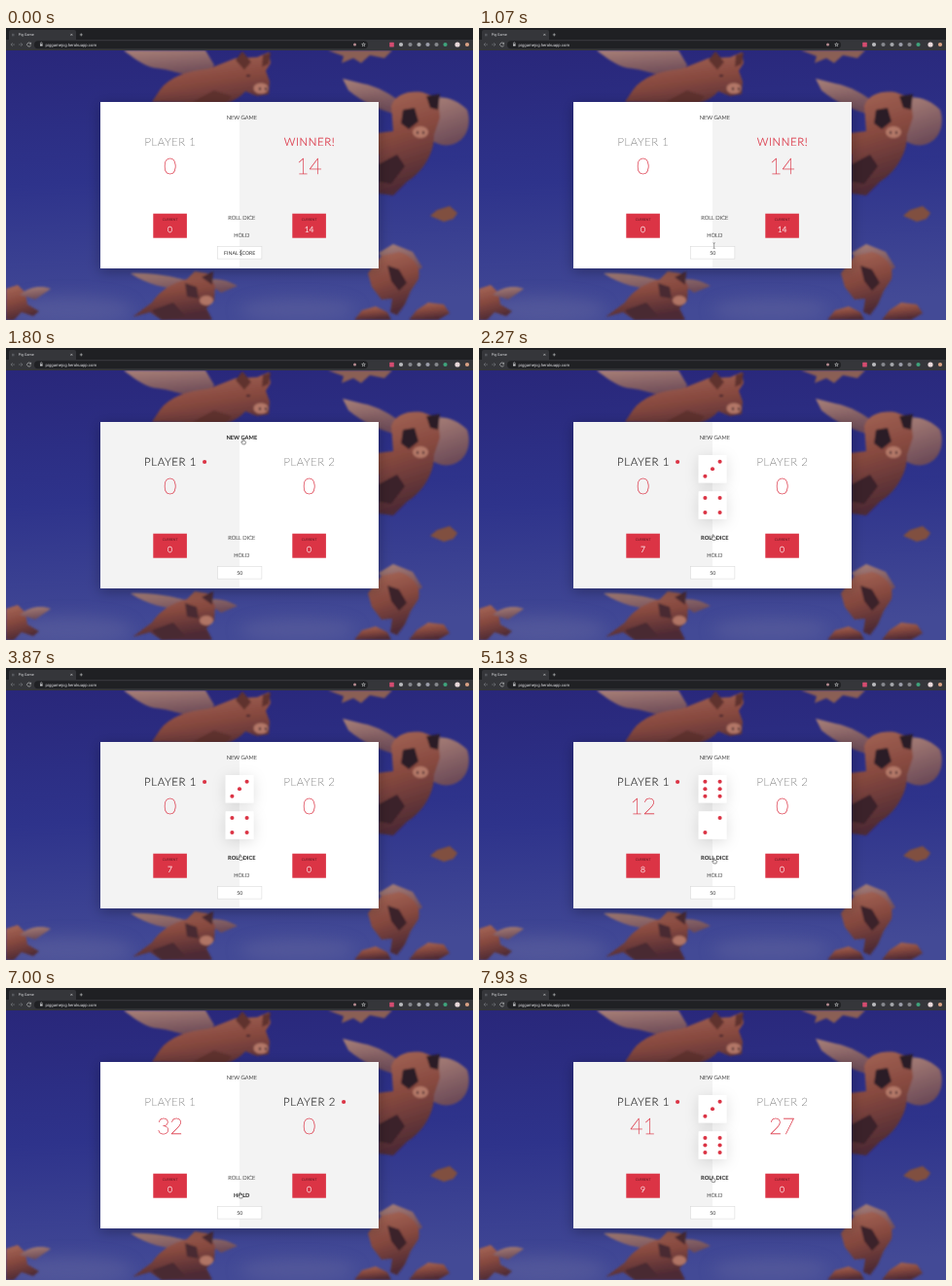
Animation of 480 by 300 pixels, one loop 8000 ms. Source, as an HTML page:

```html
<!DOCTYPE html>
<html lang="en">
<head>
<meta charset="utf-8">
<title>Pig Game</title>
<style>
  html, body { margin: 0; width: 100%; height: 100%; overflow: hidden; background: #2d3588; }
  svg { display: block; width: 100vw; height: 100vh; }
  text { font-family: Lato, sans-serif; text-rendering: geometricPrecision; }
  #game text { text-anchor: middle; }
  .btn { font-size: 5.72px; font-weight: 300; fill: #222; stroke: #222; stroke-width: .1; }
  .btn.hover { font-weight: 700; stroke: none; }
  .name { font-size: 11.43px; font-weight: 100; letter-spacing: .57px; fill: #777; stroke: #777; stroke-width: .22; }
  .name.active { font-weight: 300; fill: #222; stroke: #222; stroke-width: .12; }
  .name.winner { font-weight: 300; fill: #db3445; stroke: #db3445; stroke-width: .2; }
  .score { font-size: 22.86px; font-weight: 100; fill: #db3445; stroke: #db3445; stroke-width: .28; }
  .label { font-size: 3.43px; fill: #5a1820; }
  .current { font-size: 8.57px; font-weight: 300; fill: #fff; stroke: #fff; stroke-width: .15; }
  .field { font-size: 5.2px; fill: #333; }
  .red { fill: #db3445; }
  .ui { font-family: Roboto, sans-serif; fill: #dcdde0; }
</style>
</head>
<body>
<svg viewBox="0 0 480 300" preserveAspectRatio="none">
  <defs>
    <linearGradient id="sky" x2="0.1" y2="1">
      <stop offset="0" stop-color="#29277a"/>
      <stop offset=".5" stop-color="#2e338b"/>
      <stop offset="1" stop-color="#434a96"/>
    </linearGradient>
    <linearGradient id="skin" x2=".25" y2="1">
      <stop offset="0" stop-color="#a8695a"/>
      <stop offset=".5" stop-color="#87493f"/>
      <stop offset="1" stop-color="#4e2a34"/>
    </linearGradient>
    <linearGradient id="wing" x2=".3" y2="1">
      <stop offset="0" stop-color="#a98078"/>
      <stop offset="1" stop-color="#6e4c58"/>
    </linearGradient>
    <filter id="soft" x="-5%" y="-5%" width="110%" height="110%"><feGaussianBlur stdDeviation=".9"/></filter>
    <filter id="haze" x="-50%" y="-100%" width="200%" height="300%"><feGaussianBlur stdDeviation="8"/></filter>
    <filter id="cardShade" x="-15%" y="-20%" width="130%" height="145%"><feDropShadow dx="0" dy="2.9" stdDeviation="7" flood-opacity=".3"/></filter>
    <filter id="dieShade" x="-100%" y="-100%" width="300%" height="300%"><feDropShadow dx="0" dy="2.9" stdDeviation="7" flood-opacity=".13"/></filter>
  </defs>

  <rect y="22" width="480" height="278" fill="url(#sky)"/>
  <g filter="url(#haze)" fill="#62659f" opacity=".5">
    <ellipse cx="65" cy="290" rx="65" ry="15"/>
    <ellipse cx="300" cy="290" rx="60" ry="12"/>
  </g>

  <g filter="url(#soft)" fill="url(#skin)">
    <!-- top centre -->
    <path fill="url(#wing)" d="M205 50C184 50 168 42 152 41 140 38 130 30 121 23H205L214 38Z"/>
    <path d="M150 76L158 64C168 50 186 44 208 42L236 31 258 30 270 25 272 36 267 44 271 55 270 68 258 70 246 65C240 72 232 76 226 77H206L190 95 180 92 184 77Z"/>
    <path fill="#5f332f" d="M236 33L243 24 252 35 245 43ZM264 28L272 25 270 37 263 40ZM190 77L214 64 232 70 226 77Z"/>
    <ellipse cx="262" cy="62" rx="7.5" ry="5.5" fill="#b37767"/>
    <path fill="#3a222a" d="M247 48h4v2h-4ZM260 61h2v3h-2ZM266 61h2v3h-2Z"/>
    <!-- top right corner -->
    <path fill="#8a5f54" d="M331 23H397L389 31 374 28 365 36 357 31 345 36 347 29Z"/>
    <!-- right -->
    <path fill="url(#wing)" d="M432 74C446 68 462 72 474 84 478 96 475 110 466 116 454 124 446 120 438 116Z"/>
    <path fill="url(#wing)" d="M398 88C384 84 366 76 352 64L346 52 366 57C382 60 396 68 408 78Z"/>
    <path d="M396 80C400 68 414 64 428 66L444 72 446 92 440 110C440 130 428 148 412 158L398 172 383 170V130L362 132 360 123 381 108 398 106Z"/>
    <path fill="#2b1d27" d="M408 84L420 82 424 96 414 104 406 98ZM432 70L446 68 444 84 436 82Z"/>
    <ellipse cx="426" cy="107" rx="8" ry="6" fill="#b37868"/>
    <path fill="#3a222a" d="M422 106h2v3h-2ZM428 106h2v3h-2ZM383 140L402 130 410 142 396 160 383 158Z"/>
    <!-- distant -->
    <path fill="#80503f" d="M436 193L443 187 456 183 464 190 460 196 450 199 443 196Z"/>
    <!-- lower right -->
    <path fill="url(#wing)" d="M383 231L398 222 418 230 428 246 416 254 396 248Z"/>
    <path d="M372 252L386 234 404 230C418 234 427 244 424 258L416 270 410 284 402 295 395 292 397 278 386 279 376 266Z"/>
    <path fill="#3b2229" d="M392 244L404 248 412 262 404 270 396 260Z"/>
    <path d="M414 300L422 290 434 282 450 284 456 293 444 300Z"/>
    <path d="M358 300L366 290 380 286 392 292 396 300Z"/>
    <!-- lower left -->
    <path fill="url(#wing)" d="M182 268C164 268 146 264 128 252 150 251 170 255 188 260ZM204 260C214 256 226 258 238 265L221 272Z"/>
    <path d="M130 297L150 282C158 270 170 262 186 258L194 250 207 252 215 265 214 280 206 288 212 300H160L148 292Z"/>
    <path fill="#4a2a30" d="M184 262L196 266 198 278 186 276ZM201 256L213 250 212 264ZM150 290L172 282 184 296 160 300Z"/>
    <ellipse cx="206" cy="280" rx="7" ry="5" fill="#b07465"/>
    <!-- left edge -->
    <path d="M0 268L12 264 20 272 22 284 34 291 28 296 16 292 8 300H0Z"/>
    <path fill="url(#wing)" d="M14 274C24 266 36 264 46 268L30 279Z"/>
  </g>

  <g id="browser"></g>

  <g id="game">
    <g filter="url(#cardShade)"><rect x="97" y="76" width="286" height="171" fill="#fff"/></g>
    <rect id="side" y="76" width="143" height="171" fill="#f3f3f3"/>
    <rect x="217.5" y="224.3" width="45.4" height="12.8" fill="#fff" stroke="#d4d4d4" stroke-width=".5"/>
  </g>
  <g id="ibeam" fill="none" stroke="#333" stroke-width=".4"><path d="M-1-3Q0-3 0-2.2Q0-3 1-3M0-2.5V2.5M-1 3Q0 3 0 2.2Q0 3 1 3"/></g>
  <g id="hand"><path d="M-.9-2.5Q-.4-3.2 .2-2.5V-.7L2-.3Q2.6 0 2.4 1L1.9 2.9H-.9L-2.3.8Q-2.2 0-1.5.3L-.9.8Z" fill="#fff" stroke="#222" stroke-width=".5"/></g>
  <g id="arrow"><path d="M-1.5-3V2.2L-.3 1.2.6 3 1.5 2.6.7.9H2.2Z" fill="#222" stroke="#fff" stroke-width=".45"/></g>
</svg>
<script>
const LOOP = 8000, STEP = 1000 / 15;
const $ = id => document.getElementById(id);

function add(parent, tag, attrs, content = '') {
  const el = document.createElementNS('http://www.w3.org/2000/svg', tag);
  for (const key in attrs) el.setAttribute(key, attrs[key]);
  el.textContent = content;
  return parent.appendChild(el);
}

function drawBrowser(g) {
  const box = (x, y, width, height, fill, rx = 0) => add(g, 'rect', { x, y, width, height, fill, rx });
  const label = (x, y, size, str) => add(g, 'text', { x, y, 'font-size': size, class: 'ui' }, str);
  const line = (d, stroke = '#c8c9cc') => add(g, 'path', { d, fill: 'none', stroke, 'stroke-width': .6 });
  const dot = (cx, fill, r = 2.1) => add(g, 'circle', { cx, cy: 17, r, fill });
  box(0, 0, 480, 14, '#1f2023');
  box(3, 2, 69, 14, '#35363a', 2);
  box(0, 12, 480, 11, '#35363a');
  box(29, 13.2, 343, 8, '#202124', 4);
  box(6, 5.8, 2.5, 2.5, '#55575c');
  label(12.7, 8.3, 3.7, 'Pig Game');
  label(40.5, 18.5, 4.25, 'piggamejcg.herokuapp.com');
  line('M66.4 5.9l1.9 1.9m0-1.9l-1.9 1.9M75.8 6.9h3m-1.5-1.5v3');
  line('M9 17H5m1.8-1.8L5 17l1.8 1.8M13 17h4m-1.8-1.8L17 17l-1.8 1.8', '#77797e');
  line('M25.4 16a2 2 0 1 0 .2 1.6M25.6 14.8v1.5h-1.5');
  box(35, 16.4, 2.6, 2.2, '#c8c9cc', .3);
  line('M35.4 16.4v-.7a.9.9 0 0 1 1.8 0v.7');
  dot(358.5, '#b58a90', 1.5);
  line('M367.5 15.2l.5 1.2 1.3.1-1 .9.3 1.3-1.1-.7-1.1.7.3-1.3-1-.9 1.3-.1Z');
  box(394.2, 14.8, 4.6, 4.6, '#d54c70', .4);
  [[406, '#b8b9bc'], [415.5, '#85878c'], [424.5, '#a4a6aa'], [433.5, '#9a9ca8'],
   [442.5, '#85878c'], [451.5, '#3fa37c'], [464, '#e8d8da', 2.6], [474, '#d9a184']].forEach(d => dot(...d));
}

const game = $('game');
const write = (x, y, cls, str) => add(game, 'text', { x, y, class: cls }, str);

const buttons = [['NEW GAME', 94.1, 92], ['ROLL DICE', 196.8, 195], ['HOLD', 214.9, 213]]
  .map(([str, base, mid]) => ({ el: write(242.3, base, 'btn', str), mid }));
const field = write(240.2, 232.7, 'field');

const players = [168.6, 311.6].map(x => {
  const p = { name: write(x + .4, 121.2, 'name'), score: write(x, 149.6, 'score') };
  add(game, 'rect', { x: x - 17.3, y: 190.7, width: 34.6, height: 25, class: 'red' });
  write(x, 198.2, 'label', 'CURRENT');
  p.current = write(x, 210.3, 'current');
  p.dot = add(game, 'circle', { cx: x + 35.5, cy: 117, r: 2.1, class: 'red' });
  return p;
});

// Pips in order: centre, two diagonals, middle pair
const spots = [[0, 0], [1, -1], [-1, 1], [-1, -1], [1, 1], [-1, 0], [1, 0]];
const faces = ['', '0', '12', '012', '1234', '01234', '123456'];
const dice = [124.3, 161.5].map(cy => {
  const g = add(game, 'g', {});
  add(g, 'rect', { x: 225.7, y: cy - 14.3, width: 28.6, height: 28.6, rx: .6, fill: '#fff', filter: 'url(#dieShade)' });
  const pips = spots.map(([x, y]) => add(g, 'circle', { cx: 240 + x * 7.6, cy: cy + y * 7.5, r: 2.05, class: 'red' }));
  return { g, pips };
});

// [start, scores, current points, active player, dice, has winner]
const turns = [
  [0, [0, 14], [0, 14], 1, [], true],
  [1660, [0, 0], [0, 0], 0, []],
  [2260, [0, 0], [7, 0], 0, [3, 4]],
  [4060, [12, 0], [0, 0], 0, [1, 3]],
  [4390, [12, 0], [8, 0], 0, [6, 2]],
  [5260, [12, 0], [20, 0], 0, [6, 6]],
  [6990, [32, 0], [0, 0], 1, []],
  [7260, [41, 27], [9, 0], 0, [3, 6]]
];
const typing = [[0, 'FINAL SCORE'], [390, ''], [460, '5'], [590, '50']];
const path = [
  [0, 241.5, 231], [1000, 241.5, 231], [1470, 244, 96], [1870, 244, 96],
  [2200, 241, 194.5], [2800, 241, 194.5], [2930, 241.6, 195], [3000, 241, 194.5],
  [4000, 241, 194.5], [4200, 242, 198], [5600, 242, 198], [6200, 241, 213],
  [7259, 241, 213], [7260, 240.5, 196.5], [7860, 240.5, 196.5], [7930, 240.6, 196.2], [LOOP, 240.6, 196.2]
];

const latest = (rows, t) => rows.filter(row => row[0] <= t).pop();

function pointerAt(t) {
  const i = path.findIndex(row => row[0] > t);
  const [t0, x0, y0] = path[i - 1], [t1, x1, y1] = path[i];
  const k = (t - t0) / (t1 - t0), e = k * k * (3 - 2 * k);
  return [x0 + (x1 - x0) * e, y0 + (y1 - y0) * e];
}

function showTurn([, scores, points, active, rolled, won]) {
  $('side').setAttribute('x', 97 + 143 * active);
  players.forEach((p, i) => {
    const on = i === active;
    p.name.textContent = on && won ? 'WINNER!' : 'PLAYER ' + (i + 1);
    p.name.setAttribute('class', 'name' + (on ? won ? ' winner' : ' active' : ''));
    p.score.textContent = scores[i];
    p.current.textContent = points[i];
    p.dot.style.display = on && !won ? '' : 'none';
  });
  dice.forEach(({ g, pips }, i) => {
    g.style.display = rolled[i] ? '' : 'none';
    pips.forEach((pip, n) => pip.style.display = faces[rolled[i] || 0].includes(n) ? '' : 'none');
  });
}

function showPointer(t) {
  const [x, y] = pointerAt(t);
  let kind = y > 223 ? 'ibeam' : 'arrow';
  for (const { el, mid } of buttons) {
    const over = Math.abs(y - mid) < 5;
    el.classList.toggle('hover', over);
    if (over) kind = 'hand';
  }
  const typingNow = t >= 390 && t < 1060;
  for (const id of ['ibeam', 'hand', 'arrow']) {
    $(id).style.display = id === kind && !typingNow ? '' : 'none';
    $(id).setAttribute('transform', `translate(${x} ${y})`);
  }
}

function render(now) {
  const t = Math.floor(Math.max(0, now - start) % LOOP / STEP) * STEP;
  showTurn(latest(turns, t));
  field.textContent = latest(typing, t)[1];
  showPointer(t);
  requestAnimationFrame(render);
}

drawBrowser($('browser'));
const start = performance.now();
render(start);
</script>
</body>
</html>
```
